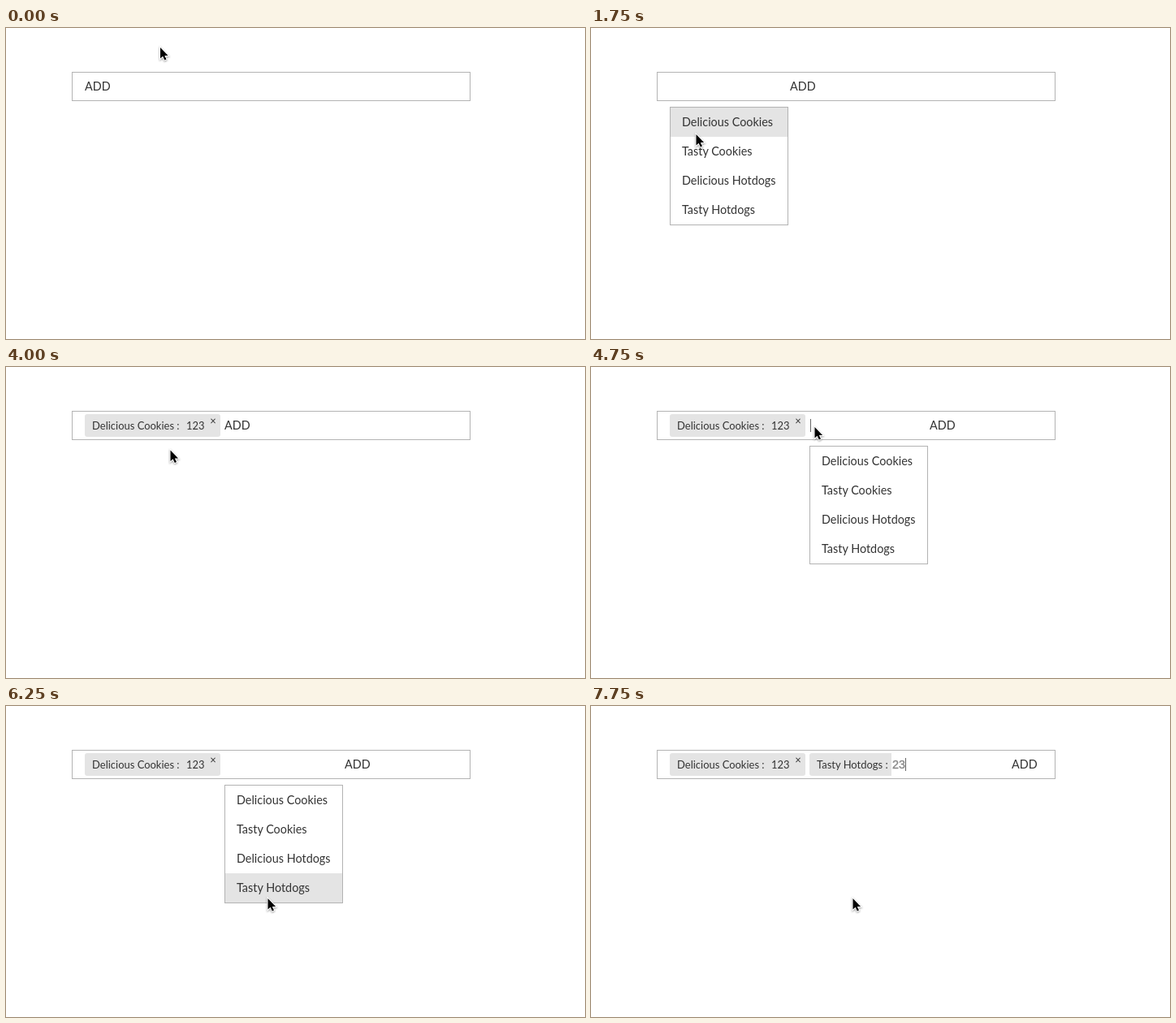
Write an HTML page that moves like this. It is 713 px wide and 383 px high and loops after 8 s.

```html
<!DOCTYPE html>
<html lang="en">
<head>
<meta charset="utf-8">
<title>Tag input</title>
<style>
html, body { margin: 0; width: 100%; height: 100%; overflow: hidden; background: #fff; }
svg { display: block; }
text { font: 14.4px Lato, sans-serif; fill: #333; white-space: pre; }
.tag { font-size: 12.96px; }
.value { font-family: "Liberation Sans", Arial, sans-serif; fill: #888; stroke: #888; stroke-width: .35px; }
.frame { fill: #fff; stroke: #b3b3b3; }
.shade { fill: #e4e4e4; }
.caret { fill: #666; }
.pointer { stroke: #fff; stroke-width: 2px; paint-order: stroke; filter: drop-shadow(0 1px 1px rgba(0, 0, 0, .4)); }
</style>
</head>
<body>
<svg id="stage" width="713" height="383"></svg>
<script>
const LOOP = 8000, TICK = 250, INPUT_WIDTH = 148;
const options = ['Delicious Cookies', 'Tasty Cookies', 'Delicious Hotdogs', 'Tasty Hotdogs'];

const phases = [
  { at: 0, mode: 'idle', left: 97 },
  { at: 1000, mode: 'menu', left: 97 },
  { at: 2000, mode: 'edit', left: 97, right: 217, label: options[0], value: '123', typeAt: 2500 },
  { at: 3500, mode: 'idle', left: 269 },
  { at: 4750, mode: 'menu', left: 269 },
  { at: 6500, mode: 'edit', left: 269, right: 370, label: options[3], value: '23', typeAt: 7500 }
];

// time, x, y
const pointerPath = [
  [0, 190, 24], [750, 118, 72], [1000, 118, 72], [1750, 129.5, 131],
  [3500, 129.5, 131], [4500, 275.5, 74], [5000, 275.5, 74],
  [5500, 313.5, 182], [6250, 322.5, 237], [LOOP, 322.5, 237]
];

const text = (x, y, str, cls = '') => `<text x="${x}" y="${y}" class="${cls}">${str}</text>`;
const rect = (x, y, w, h, cls) => `<rect x="${x}" y="${y}" width="${w}" height="${h}" class="${cls}"/>`;

function pointerAt(t) {
  const i = pointerPath.findIndex(p => p[0] > t);
  const [t0, x0, y0] = pointerPath[i - 1], [t1, x1, y1] = pointerPath[i];
  const k = (t - t0) / (t1 - t0);
  return [x0 + (x1 - x0) * k, y0 + (y1 - y0) * k];
}

function tag(left, right, label, open) {
  const r = open ? 0 : 3, w = right - left;
  return `<path class="shade" d="M${left + 3} 58h${w - 3 - r}q${r} 0 ${r} ${r}v${28 - 2 * r}q0 ${r} ${-r} ${r}h${3 + r - w}q-3 0-3-3v-22q0-3 3-3z"/>` +
    text(left + 9.1, 77, label + ' :', 'tag');
}

function menu(left, pointerY) {
  const row = Math.floor((pointerY - 98) / 36);
  return rect(left + .5, 97.5, 145, 145, 'frame') +
    (row >= 0 ? rect(left + 1, 98 + row * 36, 144, 36, 'shade') : '') +
    options.map((name, i) => text(left + 15, 121 + i * 36, name)).join('');
}

function scene(t) {
  const phase = phases.findLast(p => p.at <= t);
  const { mode, left, right, label, value, typeAt } = phase;
  const [px, py] = pointerAt(t);
  const start = mode === 'edit' ? right : left;
  const typed = mode === 'edit' ? value.slice(0, Math.max(0, (t - typeAt) / TICK + 1)) : '';
  const caretOn = mode !== 'idle' && (typed || Math.floor((t - phase.at) / 500) % 2 === 0);

  let out = rect(81.5, 54.5, 490, 35, 'frame');
  if (left > 97) {
    out += tag(97, 264, options[0]) + text(222, 77, '123', 'tag') + text(251.3, 70.5, '×', 'tag');
  }
  if (mode === 'edit') out += tag(left, right, label, true) + text(right + 1, 77, typed, 'value');
  if (mode === 'menu') out += menu(left, py);
  if (caretOn) out += rect(start + 1 + typed.length * 8, 64, 1, 16, 'caret');
  out += text(mode === 'idle' ? start : start + INPUT_WIDTH, 77, 'ADD');
  return out + `<path class="pointer" transform="translate(${px} ${py})" d="M0 0v13.6l3.1-2.9 2.2 4.8 2.2-1-2.2-4.6h4.3z"/>`;
}

const stage = document.getElementById('stage');
let shown = -1;
function draw() {
  const t = Math.floor(performance.now() % LOOP / TICK) * TICK;
  if (t !== shown) stage.innerHTML = scene(shown = t);
  requestAnimationFrame(draw);
}
draw();
</script>
</body>
</html>
```
